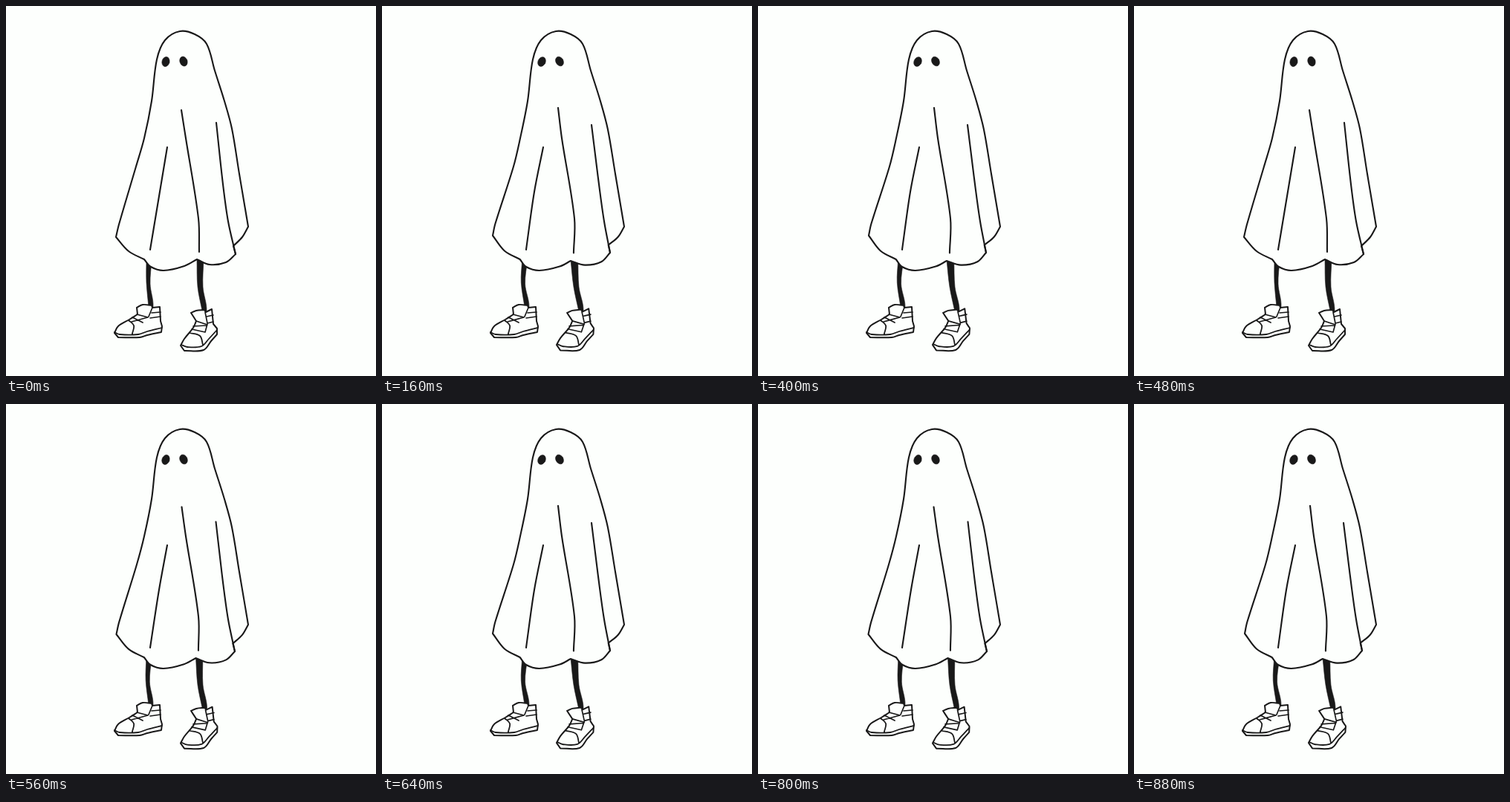
An HTML page that plays this animation: 498x498 px, repeating every 0.96 s.

```html
<!DOCTYPE html>
<html lang="en">
<head>
<meta charset="utf-8">
<title>Sheet ghost</title>
<style>
html, body { margin: 0; width: 100%; height: 100%; overflow: hidden; background: #fdfffd; }
svg { display: block; width: 498px; height: 498px; }
path, ellipse { stroke: #191919; stroke-linecap: round; stroke-linejoin: round; }
</style>
</head>
<body>
<svg id="stage" viewBox="0 0 498 498"></svg>
<script>
const INK = '#191919', PAPER = '#fdfffd', STEP = 80, POSES = 3;

// Key points; "|" makes a corner, "/" lifts the pen.
const legs = '189,342 189,372 192,405|198,405 194,374 196,342/257,340 258,378 264,410|270,410 265,378 266,340';
const sheet = '148,311 152,294 175,216 186,178 196,128 203,72 214,46 234,34 254,38 270,51 281,87 294,128 304,165 314,226 326,297' +
  '|318,311 306,323|309,334|296,345 274,348 257,341|240,350 212,356 195,351 186,341|165,330 148,311';
const folds = '217,190 207,250 194,328/236,140 242,178 259,286 260,331/283,157 292,240 299,290 309,334';
const shoes = [
  { body: '176,406 184,402 196,403|197,406|207,405|208,424|210,431|209,439|190,443 180,446 151,446|146,440|151,431 166,422 177,415|176,406',
    trim: '146,439 153,442 178,442 190,438 210,433/165,423 172,430 170,441',
    laces: '197,406 192,418/196,413 208,412/194,420 208,418/170,419 184,426/176,415 191,419/169,425 191,419' },
  { body: '249,413 256,410 267,409|269,412|277,408|279,428|284,434|284,442|276,451 266,463 240,464|235,457|240,448 252,433 256,424|249,413',
    trim: '236,456 244,459 263,458 273,448 284,436/247,440 261,444 265,456',
    laces: '268,412 271,427/270,418 279,416/271,427 279,425/256,424 271,429/252,431 270,430/250,435 268,439/271,428 268,439' }
];
const eyes = [[215, 75, 15], [239, 74.5, -20]];

// Spots that get redrawn a little off: x, y, dx, dy
const pulls = [
  [148, 311, 1, -2], [175, 216, 2, 0], [309, 334, -2, -2], [257, 341, -3, 2], [236, 140, 1, -3],
  [283, 157, -1, 3], [207, 250, -2, 0], [190, 365, -2, 0], [280, 420, 2, -1], [238, 452, 0, -1]
];

function warp([x, y], k) {
  let u = x, v = y;
  for (const [px, py, dx, dy] of pulls) {
    const w = k * Math.exp(-((x - px) ** 2 + (y - py) ** 2) / 300);
    u += dx * w;
    v += dy * w;
  }
  return [u, v];
}

// Smooth curve through the points of each run, with sharp joints between runs
function trace(text, k) {
  let d = '';
  for (const stroke of text.split('/')) {
    let last;
    for (const run of stroke.split('|')) {
      const pts = run.split(' ').map(p => warp(p.split(',').map(Number), k));
      if (last) pts.unshift(last);
      else d += 'M' + pts[0];
      for (let i = 1; i < pts.length; i++) {
        const p = pts[i - 1], q = pts[i], before = pts[i - 2] || p, after = pts[i + 1] || q;
        const len = Math.hypot(q[0] - p[0], q[1] - p[1]);
        const pull = (a, b) => len / 3 / Math.hypot(b[0] - a[0], b[1] - a[1]);
        const s = pull(before, q), t = pull(p, after);
        const c1 = p.map((v, n) => v + (q[n] - before[n]) * s);
        const c2 = q.map((v, n) => v - (after[n] - p[n]) * t);
        d += `C${c1} ${c2} ${q}`;
      }
      last = pts[pts.length - 1];
    }
  }
  return d;
}

function add(parent, tag, attrs = {}) {
  const el = document.createElementNS('http://www.w3.org/2000/svg', tag);
  for (const k in attrs) el.setAttribute(k, attrs[k]);
  return parent.appendChild(el);
}

function drawPose(k) {
  const g = add(stage, 'g');
  const draw = (text, width, fill = 'none') =>
    add(g, 'path', { d: trace(text, k), fill, 'stroke-width': width });
  draw(legs, .6, INK);
  draw(sheet, 2.1, PAPER);
  draw(folds, 2.1);
  for (const { body, trim, laces } of shoes) {
    draw(body, 2, PAPER);
    draw(trim, 1.8);
    draw(laces, 1.7);
  }
  for (const [cx, cy, tilt] of eyes) {
    const turn = tilt + k * 10 * Math.sign(tilt);
    add(g, 'ellipse', { cx, cy, rx: 5, ry: 6.6, fill: INK, 'stroke-width': .6, transform: `rotate(${turn} ${cx} ${cy})` });
  }
  return g;
}

const stage = document.getElementById('stage');
const total = STEP * POSES;
for (let n = 0; n < POSES; n++) {
  drawPose(n / (POSES - 1)).animate([
    { opacity: 1, offset: 0 }, { opacity: 1, offset: 1 / POSES },
    { opacity: 0, offset: 1 / POSES }, { opacity: 0, offset: 1 }
  ], { duration: total, delay: n * STEP - total, iterations: Infinity });
}
</script>
</body>
</html>
```
